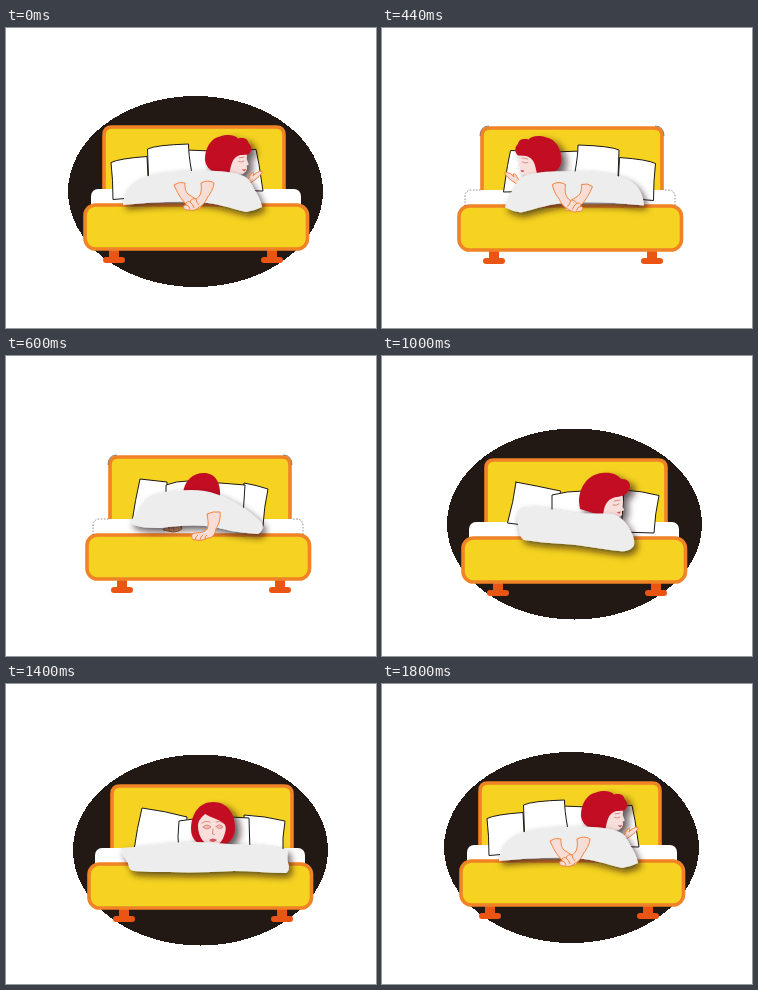
These frames come from a looping animation (370 px wide and 300 px high, 2000 ms). An HTML page:

```html
<!DOCTYPE html>
<html lang="en">
<head>
<meta charset="utf-8">
<title>Restless sleeper</title>
<style>
  html, body { margin: 0; width: 100%; height: 100%; overflow: hidden; background: #fff; }
  svg { display: block; width: 370px; height: 300px; }

  /* Five poses share one cycle, each held for a fifth of it. */
  .pose { visibility: hidden; animation: hold 2s step-end infinite; animation-delay: var(--shift); }
  @keyframes hold {
    0% { visibility: visible; }
    20%, 100% { visibility: hidden; }
  }

  .night { fill: #221914; shape-rendering: crispEdges; }
  .wood { fill: #f6d321; stroke: #f08326; stroke-width: 3.6; }
  .leg { fill: #ea5514; }
  .mattress { fill: #fff; }
  .edge { fill: none; stroke: #4a423e; stroke-width: .6; }
  .pillow { fill: #fff; stroke: #1c1816; stroke-width: 1; stroke-linejoin: round; }
  .blanket { fill: #ededee; }
  .hair { fill: #c30d23; }
  .face { fill: #f8dfdc; }
  .skin { fill: #f8ddd6; stroke: #f0843c; stroke-width: 1; stroke-linejoin: round; }
  .line { fill: none; stroke: #d98078; stroke-width: .9; stroke-linecap: round; }
  .lips { fill: #d4575a; }
  .soft { filter: url(#shadow); }
  .deep { filter: url(#deepShadow); }
</style>
</head>
<body>
<svg viewBox="0 0 370 300" role="img" aria-label="A sleeper tossing and turning in bed">
  <defs>
    <filter id="shadow" x="-20%" y="-40%" width="140%" height="190%">
      <feDropShadow dx="3" dy="4" stdDeviation="3.500" flood-color="#231815" flood-opacity=".7"/>
    </filter>
    <filter id="deepShadow" x="-30%" y="-30%" width="180%" height="180%">
      <feDropShadow dx="5" dy="4" stdDeviation="3.500" flood-color="#231815" flood-opacity=".7"/>
    </filter>

    <ellipse id="night" class="night" cx="192.500" cy="168" rx="127.500" ry="95.500"/>
    <path id="headboard" class="wood" d="M104 190V112q0-8 8-8h164q8 0 8 8v78z"/>
    <rect id="mattress" class="mattress" x="87" y="166" width="210" height="30" rx="7"/>
    <g id="mattressEdge" class="edge">
      <path stroke-dasharray="1.500 1.500" d="M87 182v-9q0-7 7-7h9M287 166h3q7 0 7 7v9"/>
      <path d="M102 112q0-10 9-10M277 102q9 0 9 10"/>
    </g>
    <rect id="footboard" class="wood" x="81" y="182" width="222.500" height="44" rx="10.500"/>
    <g id="legs" class="leg">
      <path id="leg" d="M111 224h10v10h3q3 0 3 3t-3 3h-16q-3 0-3-3t3-3h3z"/>
      <use href="#leg" x="158"/>
    </g>

    <g id="bed">
      <use href="#legs"/><use href="#headboard"/>
      <use href="#mattress"/><use href="#footboard"/>
    </g>

    <g id="sidePillows" class="pillow">
      <path d="M180 122l26 1v28h-26z"/>
      <path d="M209 123l41-1.500 3 15 4 26.500-45-1z"/>
      <path d="M105 134.500q8-4 36-6l2 40-36 3q0-20-2-37z"/>
      <path d="M141.500 121q8-4 41-5 0 10 3 27l-1 6h-42z"/>
    </g>
    <g id="sideHead">
      <path class="face" d="M220 146l4-16q8-5 17-4l-.5 5 2 5.500-2 1 .5 3-1.500 3-3 2.500-7 1z"/>
      <path class="hair" d="M199 131C199 120 205 110 214 108.500 222 106 229 107 232 110.500 238 109 242 111 242.500 115 246 118 246 123 243 126 240 128 234 125 229 130 225 134 225 140 223 146 213 145 203 143 201 138 199.500 135 199 133 199 131z"/>
      <path class="line" d="M233 130l5-1M232.500 133.500q3 1.500 5.500-.5"/>
      <path class="lips" d="M236 141.500l4-.5-1 2q-2 .5-3-1.500z"/>
    </g>
    <path id="sideHand" class="skin" d="M239 154q4-3 6-8 2-2 3-1l-1 3q3-4 8-5 2 0 1 2-3 4-6 6-4 4-10 5z"/>
    <path id="sideBlanket" class="blanket" d="M117 177c1-12 6-22 19-27 13-5 30-7 48-7 22-1 41 0 51 4 7 2 10 8 13 14 4 6 7 12 8 18q-8 4-16 5c-16-4-30-9-48-10-25-1-48 0-75 3z"/>
    <g id="sideFeet" class="skin">
      <path d="M168 157q5-4 11-2c0 5 0 8 3 11 4 3 9 5 12 9 2 3 1 6-2 6-4 1-8-2-13-6-4-4-8-11-11-18z"/>
      <path d="M195 155q7-4 13 0c-1 7-4 11-7 15-2 5-5 8-8 9-3 3-7 4-9 3-3 0-6 0-6-2-1-2 0-3 2-3-1-3 2-4 4-3 1-3 4-4 6-3 5-3 6-8 5-16z"/>
      <path d="M180 177q3 0 4 4M184 174q3 2 4 6M190 171q0 3 3 6" fill="none"/>
    </g>
  </defs>

  <!-- lying on the right side -->
  <g class="pose" style="--shift:-.2s">
    <use href="#night" x="-3" y="-4.500"/>
    <use href="#legs" x="-8" y="-5"/>
    <use href="#headboard" x="-6" y="-5"/>
    <use href="#mattress" x="-2" y="-5"/>
    <use href="#footboard" x="-2" y="-5"/>
    <use href="#sidePillows"/>
    <g class="deep"><use href="#sideHead"/></g>
    <use href="#sideHand"/>
    <g class="soft"><use href="#sideBlanket"/></g>
    <use href="#sideFeet"/>
  </g>

  <!-- lying on the left side: mirrored, but lit from the same direction -->
  <g class="pose" style="--shift:-1.8s">
    <g transform="translate(-4 -4)"><use href="#bed"/><use href="#mattressEdge"/></g>
    <use href="#sidePillows" transform="matrix(-1 0 0 1 378.500 1)"/>
    <g class="deep"><use href="#sideHead" transform="matrix(-1 0 0 1 378.500 1)"/></g>
    <use href="#sideHand" transform="matrix(-1 0 0 1 379 1)"/>
    <g class="soft"><use href="#sideBlanket" transform="matrix(-1 0 0 1 379 .500)"/></g>
    <use href="#sideFeet" transform="matrix(-1 0 0 1 378.500 1.500)"/>
  </g>

  <!-- face down -->
  <g class="pose" style="--shift:-1.4s">
    <g transform="translate(0 -3)"><use href="#bed"/><use href="#mattressEdge"/></g>
    <g class="pillow">
      <path d="M134 123l27 3v40l-35 0q3-21 8-43z"/>
      <path d="M238 127q12 2 24 6-4 18-5 37l-24-4z"/>
      <path d="M160 129q10-4 22-4 14 2 32 2l25 2-2 31-77-1z"/>
    </g>
    <path class="hair" d="M177 138c1-13 9-21 21-21 11 0 17 9 16 25z"/>
    <path class="skin" d="M157 174q3-5 9-5h9l1 4q-4 3-9 3z" style="fill:#dca27d;stroke:#a65e2c"/>
    <path class="line" d="M162 171l2 4M167 171l1 4" style="stroke:#a65e2c"/>
    <path class="blanket soft" d="M124 166C130 158 134 152 138 145 146 136 158 136 170 135 185 133 200 134 210 138 226 143 241 153 255 166 258 170 257 175 252 178 240 177 228 176 217 173 200 168 175 169 155 172 140 172 128 171 124 166z"/>
    <g class="skin">
      <path d="M201 158q6-3 13-2c1 8-2 13-4 17-1 6-4 9-8 9-4 2-8 3-12 2-3 0-5-2-4-3-1-3 1-4 4-4 5 0 9-1 11-4 2-4 1-9 0-15z"/>
      <path d="M189 184q1-4 3-5M194 184q0-3 3-5M199 183q0-3 2-4" fill="none"/>
    </g>
  </g>

  <!-- curled up -->
  <g class="pose" style="--shift:-1s">
    <use href="#night"/>
    <use href="#bed"/>
    <g class="pillow">
      <path d="M133.500 126q22 4 45 9l-5 38-48-6q6-21 8.500-41z"/>
      <path d="M170 139q15-4 31-4h42v30h-73z"/>
      <path d="M242 134q18 1 35 5.500-4 18-5 37.500l-33-1z"/>
    </g>
    <g class="deep">
      <path class="face" d="M219 142l21-4 1 7-.5 6 1.500 3-2 1v4l-3 2-16-1z"/>
      <path class="hair" d="M197 146C197 130 207 118 220 117 230 116 236 119 239 123 246 122 250 128 247 134 244 141 236 140 231 142 223 145 222 152 221 160L198 153z"/>
      <path class="line" d="M232 145l6-1M231 149q4 1 6-1"/>
      <path class="lips" d="M235 156l4-.5-1 2q-2 .5-3-1.500z"/>
    </g>
    <path class="blanket soft" d="M135 163c0-8 2-12 8-12 16-1 31 4 47 6 13 1 27 0 39 1 8 1 14 7 18 14 4 7 6 12 5 17-2 5-8 7-15 6-19-2-36-6-55-7-15-1-28-2-40-4-4-2-4-7-5-11z"/>
  </g>

  <!-- on the back -->
  <g class="pose" style="--shift:-.6s">
    <use href="#night" x="2" y="-2"/>
    <use href="#bed" x="2" y="-2"/>
    <g class="pillow">
      <path d="M136 124q23 3 45 9l-3 36-50-3q3-22 8-42z"/>
      <path d="M238 131q21 1 41 6-3 17-2 34l-38-2z"/>
      <path d="M173 137q35-6 70-3l1 35h-71q-2-17 0-32z"/>
    </g>
    <path class="hair deep" d="M185 145c0-16 9-27 22-27 14 0 22 11 22 26 0 12-9 19-22 19-14 0-22-7-22-18z"/>
    <path class="face" d="M192 142c0-6 4-9 7-12 6 4 14 5 18 9 4 2 3 8 1 13-2 6-6 10-11 10-8 0-15-9-15-20z"/>
    <g class="line">
      <path d="M196 139q4-3 8-1M210 138q4-2 7 1M207 145l-.5 5 2 .5"/>
      <path d="M197 143q4-4 8 0-4 4-8 0M210 142.500q4-3.500 7 .5-4 3.500-7-.5" fill="#eeb9b5"/>
    </g>
    <path class="lips" d="M203 156q4-3 8 0-4 4-8 0z"/>
    <path class="blanket soft" d="M115 164c14-1 25-2 39-4 18-2 38-3 57-1 15 2 30 1 45 3 9 1 17 2 26 4-1 6-1 11 1 16 0 4-1 6-3 7-18 0-34-2-52-2-21 1-42 2-64 1-12 0-24 0-36-1-5-1-5-4-6-8-3-5-6-9-7-15z"/>
  </g>
</svg>
</body>
</html>
```
